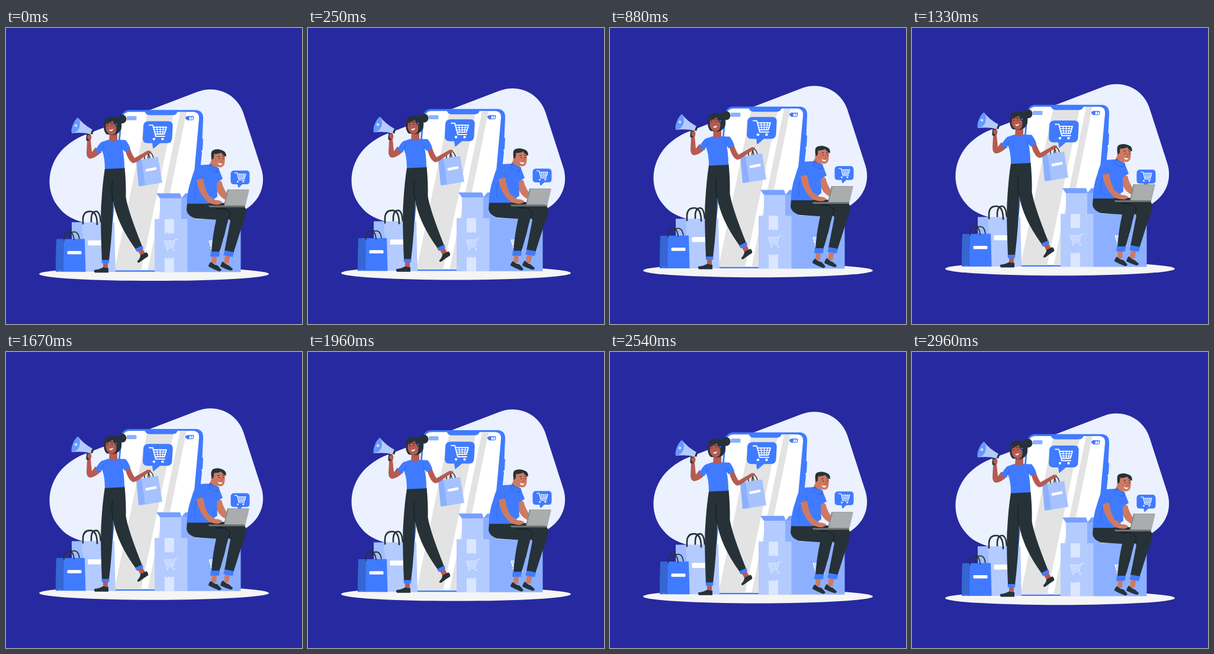
An HTML page for the animation above (3 s loop, 500x500 px).

```html
<!DOCTYPE html>
<html lang="en">
<head>
<meta charset="utf-8">
<title>Online shopping</title>
<style>
  html, body { margin: 0; width: 100%; height: 100%; overflow: hidden; background: #2729a0; }
  svg { display: block; width: 100%; height: 100%; }
  .blue { fill: #407bff; }
  .navy { fill: #3566d2; }
  .mid { fill: #8cb0ff; }
  .soft { fill: #a6c2ff; }
  .pale { fill: #b3cbff; }
  .dark { fill: #263238; }
  .skin { fill: #b55b52; }
  .tan { fill: #ce7a63; }
  .white { fill: #fff; }
  .line { fill: none; stroke-linecap: round; stroke-linejoin: round; }
</style>
</head>
<body>
<svg viewBox="0 0 500 500">
  <defs>
    <g id="cart">
      <path class="line" stroke="currentColor" stroke-width="1.900" d="M1 1H7L12 20.500H27M8.300 4.500H30L26.500 16.500H11"/>
      <path class="line" stroke="currentColor" stroke-width="1.300" d="M9.500 8.500H29M10.300 12.500H28M14 4.500L15.300 16.500M19.500 4.500V16.500M25 4.500L23.300 16.500"/>
      <g fill="currentColor"><circle cx="9" cy="25" r="2.200"/><circle cx="23.500" cy="25" r="2.200"/></g>
    </g>
    <clipPath id="screen"><path d="M209 142H317Q327 143 326 154L303 409.500H173L196 154Q198 142 209 142Z"/></clipPath>
  </defs>

  <g id="scene">
    <path fill="#ebf1ff" transform="translate(.8 .2)" d="M322 108C355 95 391 112 401 146L431 239C440 271 423 303 386 314C330 330 260 332 190 332C151 334 111 331 90 305C65 277 68 235 93 207C106 193 122 184 139 178Z"/>
    <ellipse cx="250" cy="415.800" rx="194" ry="11.500" fill="#f5f5f5"/>

    <g id="phone">
      <path class="blue" d="M208 138.700H320Q334 139 333 155L331.500 187L333 188L332 206L330 208L331 211L329 230L310 412H170L193 156Q195 139 208 138.700Z"/>
      <path class="white" d="M209 142H317Q327 143 326 154L303 409.500H173L196 154Q198 142 209 142Z"/>
      <path fill="#e3e3e3" clip-path="url(#screen)" d="M239 142H284L228 411H183ZM294 142H305L250 411H239Z"/>
      <path class="blue" d="M234 139H290Q290 147.500 281 147.500H243Q235 147.500 234 139Z"/>
      <rect class="mid" x="204" y="149" width="16.500" height="7" rx="1.500"/>
      <path class="blue" d="M306 149H316Q318 149 317.500 151L317 154Q316.500 156 315 156H306L303 153V151Z"/>
      <path class="white" d="M310 150.500H312.500V155H309.500ZM313.700 150.500H316L315.500 155H313.200Z"/>
    </g>
  </g>

  <g id="bigBubble" color="#fff">
    <path class="blue" d="M241 158H274Q282 158 281.700 166L280.500 187Q280 195 272 195H260L250 203.500Q248 205 248 202L247 195H239Q231 195 231 187L232 166Q232.500 158 241 158Z"/>
    <use href="#cart" transform="translate(241 163.500) scale(1 .98)"/>
  </g>

  <g id="front">
    <g id="bags">
      <path class="line" stroke="#263238" stroke-width="2.600" d="M144 332V321Q145 310 152 310Q159 310 160 330"/>
      <path class="pale" d="M111 328.500L183 328L185 412H113Z"/>
      <path fill="#9fbdff" d="M111 328.500H128L134 412H113Z"/>
      <path class="line" stroke="#263238" stroke-width="2.600" d="M130 331V322Q131 310 142 310Q154 310 154 332"/>
      <rect class="white" x="138.500" y="359" width="24" height="8.500" rx="1.500"/>
      <path class="line" stroke="#263238" stroke-width="1.800" d="M107 358V353Q107 344.500 115 344.500Q123 344.500 124 358"/>
      <path class="blue" d="M85 357L133 356.500L134.500 412H84Z"/>
      <path class="navy" d="M85 357H98L97 411.500L91 409L84 412Z"/>
      <path class="line" stroke="#263238" stroke-width="1.800" d="M98 359V354Q99 344.500 106 344.500Q114 345 115 358"/>
      <rect class="white" x="103.500" y="377" width="24" height="5.500" rx="1.500"/>
    </g>

    <g id="boxes">
      <path class="pale" d="M260 288H296V324H260Z"/>
      <path class="mid" d="M296 288H320V324H296Z"/>
      <path fill="#76a0ff" d="M254 279.500H294L297 288H260Z"/>
      <path fill="#76a0ff" d="M303 279.500H330V288H296Z"/>
      <path class="mid" d="M306 323H396.500V412.500H306Z"/>
      <path class="pale" d="M251 323H306.500V412.500H251Z"/>
      <path fill="#dbe6ff" d="M268 323H284V346L281 348L278 346L275 348L272 346L268 348ZM268 388L272 390L275 388L278 390L281 388L284 389V412.500H268Z"/>
      <use href="#cart" transform="translate(291 356.500) scale(-.78 .74)" color="#dbe6ff"/>
      <use href="#cart" transform="translate(368 356.500) scale(-.82 .78)" color="#fff"/>
    </g>

    <g id="woman">
      <path class="line" stroke="#263238" stroke-width="1.500" d="M234 222Q233 212 238 212Q242 212 243 220M240 222Q240 210 244 211Q247 212 249 219"/>
      <path class="soft" d="M220 224L257 218L264 261.500L226 268Z"/>
      <path class="mid" d="M220 224L229 222.500L235 266L224 267.500Z"/>
      <rect class="white" x="235.500" y="236.800" width="19" height="4.500" rx="1.500" transform="rotate(-11 245 239)"/>

      <path class="skin" d="M164 391H172V407H164ZM221 374L229 370L235 381L228 386Z"/>
      <path class="dark" d="M149 409Q158 408 164 404.500L173 406V413.500H150Q148 411 149 409ZM222 394Q227 389 227 384L237 379Q241 382 240 386Q232 391 225 396.500Q221 397 222 394Z"/>
      <path class="dark" d="M167 237.500L200.500 236Q203 264 202.500 286Q206 309 230 369L219 374Q196 342 187 315Q184 307 181 292Q180 345 174 393H162Q159 320 161 297Q163 263 167 237.500Z"/>
      <path class="line" stroke="#0f181c" d="M180 259Q177 277 181 293"/>
      <path class="blue" d="M161.500 392H174.500L174 397.500H162ZM218 373.500L230.500 367.500L232 373L221 378.500Z"/>

      <path class="skin" d="M175 178L188 177L188 191Q181 197 174 191Z"/>
      <path class="skin" d="M151 202L161 210Q151 220 142 221Q136 220 136 211L137 191Q134 187 137 181L142 179Q146 183 143 190L145 210Z"/>
      <path class="skin" d="M203 204L209 203Q213 214 217 220Q226 215 233 211L239 207.500Q246 207 245 210L239 214L234 217Q221 228 215 228.500Q207 226 202 209Z"/>
      <path class="blue" d="M173 189Q181 195 188 189L202 189.500Q207 195 210 204Q205 209 200 209L197 205Q200 219 200 237L167 238.500Q167 218 162 207L160 212Q154 211 151 207Q156 197 161 193Z"/>
      <path class="line" stroke="#2f64db" d="M162 207L165 199M197 205L195 199"/>

      <g id="womanHead">
        <path class="dark" d="M167 154Q180 146 191 153Q197 161 194.500 171Q191 179 183 181L170 180Q164 174 165.500 164Z"/>
        <circle class="dark" cx="196" cy="154" r="7.500"/>
        <path class="skin" d="M169 160Q175 156 181 156Q183 162 186 163Q187 169 186 174Q185 180.500 178 180.500Q170 179 168.500 170Z"/>
        <path class="dark" d="M168 163Q172 155 182 152L190 157L187 167Q182 164 180.500 157Q174 161 168 163Z"/>
        <path class="line" stroke="#263238" d="M170 162L172.500 161.500M176.500 161L180.500 161"/>
        <circle class="dark" cx="172" cy="165" r=".9"/><circle class="dark" cx="179" cy="164.500" r=".9"/>
        <path class="white" d="M174 172.500Q178 172.500 181 170.500Q180 174.500 177 174.500Q175 174.300 174 172.500Z"/>
        <circle class="blue" cx="186" cy="163" r="1.300"/>
      </g>

      <path class="dark" d="M136 179L142 179.500L140.500 190Q138 192 135.500 190Z"/>
      <path class="pale" d="M121.500 151.500Q130 163 147 172.500L144 179.500Q128 176 111 178Z"/>
      <path fill="#6798ff" d="M121.500 151.500Q127 158 124 168Q121 177 111 178Q109 172 114 161Q118 153 121.500 151.500Z"/>
      <circle cx="118" cy="165" r="2.400" fill="#c9dbff"/>
      <path class="dark" d="M145.500 172L148.500 173L146 180L143 179Z"/>
      <path class="skin" d="M137 182Q143 179 144 183Q145 187 142 189L138 188Z"/>
    </g>
  </g>

  <g id="smallBubble" color="#fff">
    <path class="blue" d="M386 241.200H406Q411.500 241.200 411.500 247V259Q411.500 264.500 406 264.500H399L394 269.500Q392 271 392 268L391 264.500H385Q379.500 264.500 379.500 259V247Q379.500 241.200 386 241.200Z"/>
    <use href="#cart" transform="translate(385.800 244.500) scale(.64 .62)"/>
  </g>

  <g id="man">
    <path class="tan" d="M348 384H356L355 398H347ZM370 384H379L376 398H368Z"/>
    <path class="dark" d="M346 395.500Q353 401 357 401Q362 406 364 409Q362 412 359 411Q349 407 342 403Q342 399 346 395.500ZM366 394.500Q372 400 376 401L383 407Q383 410 379 410Q369 407 362 403Q363 398 366 394.500Z"/>
    <path class="dark" d="M306 296H387Q406 299 406 310Q404 324 397 340L384 381L369 377L379 326L376 322Q372 336 369 350L360 381L347 379Q349 350 355 324L321 322Q306 318 305 307Z"/>
    <path class="line" stroke="#0f181c" d="M354 306Q375 303 379 314L376 323"/>
    <path class="blue" d="M346 378H361L360 386.500H345ZM370 376L385 379L383 387L367 384Z"/>

    <path class="tan" d="M354 258L364 259Q367 273 378 286L374 292Q361 287 356 275Z"/>
    <path class="tan" d="M348 222L358 229L357 241L343 232Z"/>
    <path class="blue" d="M343 231L359 237L366 255L356 261.500L357 285L341 297H305.500Q306 275 313 256Q318 237 324 232Z"/>
    <path fill="#3268e6" d="M343 231L347 230Q350 236 360 237L357 245Q349 243 343 238Z"/>
    <path class="blue" d="M344 232Q350 236 359 238L355 243Q348 242 344 237Z"/>
    <path class="line" stroke="#3268e6" d="M334 255L331 248M322 261Q316 275 320 289"/>
    <path class="tan" d="M322 257L333 254Q335 270 342 283L354 291Q364 291 366 296L361 299Q352 299 343 296Q325 281 322 257Z"/>

    <g id="manHead" transform="translate(.6 .6)">
      <path class="tan" d="M349 212Q358 207 367 211Q370 216 369 224Q369 234 362 235Q353 235 349 226Q345 225 346 220Z"/>
      <path class="dark" d="M347 222Q344 209 349 206Q358 202 368 208Q372 211 371 217Q366 215 363 210Q356 213 351 212L350 220Z"/>
      <path class="line" stroke="#263238" d="M357 217L360 216M365 216L368 217"/>
      <circle class="dark" cx="359.500" cy="220" r=".9"/><circle class="dark" cx="366.500" cy="220" r=".9"/>
      <path class="line" stroke="#a6534c" stroke-width=".9" d="M363.500 220L365 225L362.500 225"/>
      <path class="white" d="M357 227.500Q361 229 365 228.500Q363.500 231.500 360.500 231Q358 230.500 357 227.500Z"/>
    </g>

    <path class="dark" d="M357 299.500L365 296H378V300H357Z"/>
    <path fill="#737373" d="M342 300H404V303H344Q342 302 342 300Z"/>
    <path fill="#868686" d="M374 273H410L403 300H368Z"/>
    <path fill="#a9adae" d="M376 273.500H411L404.500 300H369.500Z"/>
  </g>
</svg>
<script>
  const AMPLITUDE = 10;
  const START = 30;
  const layers = [
    { ids: ["scene", "front", "man"], period: 3000 },
    { ids: ["bigBubble", "smallBubble"], period: 1500 }
  ];

  // Linear rise and fall within one period.
  function floatOffset(time, period) {
    const phase = (time % period) / period;
    return -AMPLITUDE * (1 - Math.abs(2 * phase - 1));
  }

  function draw(time) {
    for (const { ids, period } of layers) {
      const y = floatOffset(time + START, period).toFixed(3);
      for (const id of ids) {
        document.getElementById(id).setAttribute("transform", `translate(0 ${y})`);
      }
    }
  }

  const begin = performance.now();
  function tick() {
    draw(performance.now() - begin);
    requestAnimationFrame(tick);
  }
  tick();
</script>
</body>
</html>
```
